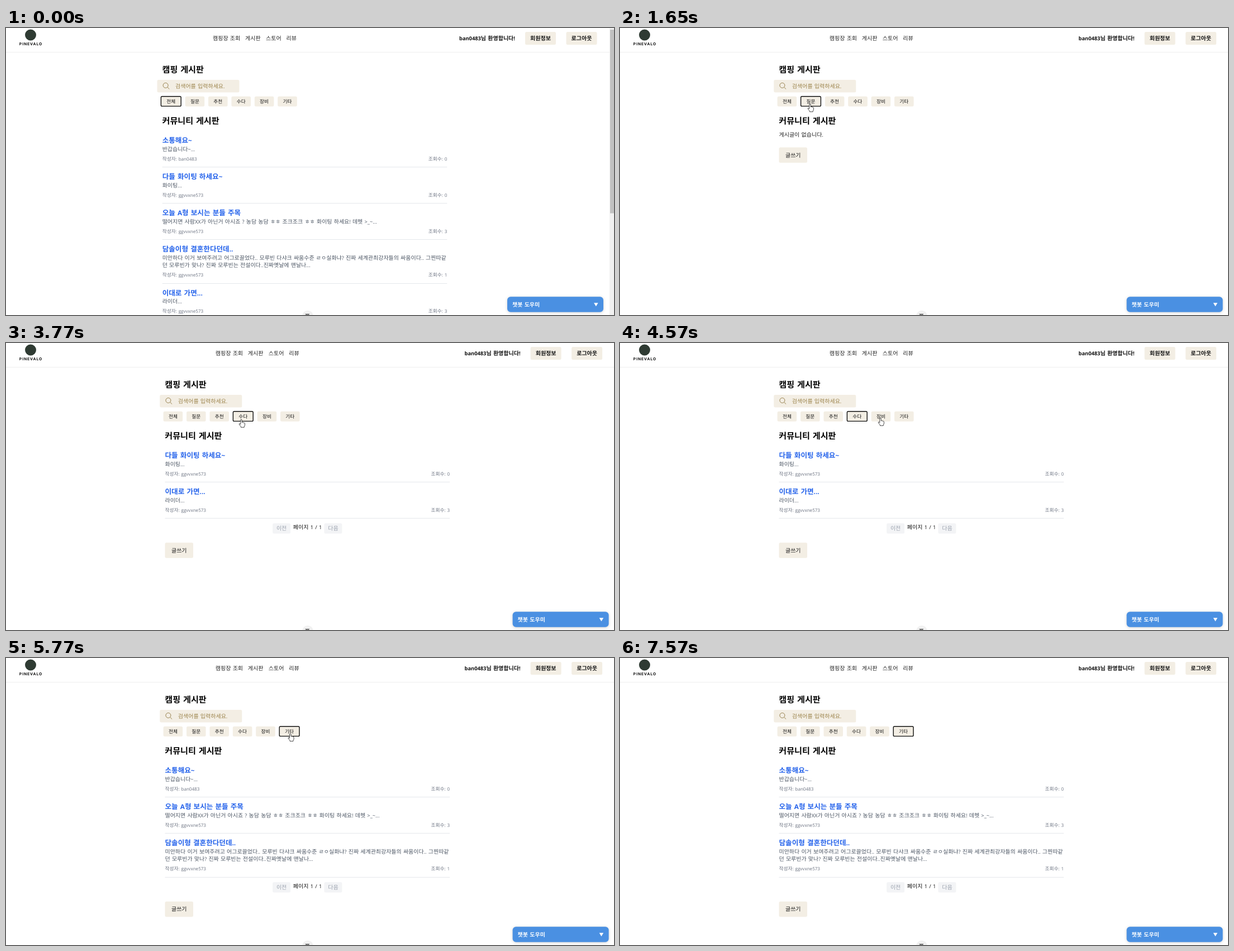
An HTML page for the animation above (8300 ms loop, 1088x515 px).

```html
<!DOCTYPE html>
<html>
<head>
<meta charset="utf-8">
<title>캠핑 게시판</title>
<style>
html, body { margin: 0; width: 100%; height: 100%; overflow: hidden; background: #fff; }
svg { display: block; width: 100%; height: 100%; }
text {
  font-family: "Noto Sans CJK KR", "Noto Sans CJK", sans-serif;
  word-spacing: .1em;
  text-rendering: geometricPrecision;
}
tspan { font-family: "Open Sans", "Noto Sans", sans-serif; font-size: .93em; }
.brand { font-family: Inter, sans-serif; letter-spacing: .9px; }
.chat { filter: drop-shadow(0 1.5px 2.5px rgba(0, 0, 0, .18)); }
#cursor path { fill: #fff; stroke: #1c1c1c; stroke-width: .8; stroke-linejoin: round; }
#cursor #beam { fill: none; stroke-width: 1; }
</style>
</head>
<body>
<svg viewBox="0 0 1088 515" preserveAspectRatio="none">
  <g id="page"></g>
  <g id="cursor">
    <path id="arrow" d="M0 0V10L2.4 8L4 11.6L5.5 11L4 7.4H7.2Z"/>
    <path id="hand" d="M-1.2 1Q0-.6 1.2 1V5.5Q2.2 4.8 3 5.8Q4 5.2 4.8 6.3Q6.2 5.8 6.4 7.5V10Q6.2 12 5.2 13V14.3H-.6V13Q-2 11.5-3.6 9Q-4.2 7.6-2.8 7.6L-1.2 9Z"/>
    <path id="beam" d="M-1.5-4H1.5M0-4V4M-1.5 4H1.5"/>
  </g>
</svg>
<script>
const LOOP = 8300, STEP = 200 / 3;
const SAND = '#f3eee4', INK = '#111', GRAY = '#4b5563', MUTED = '#6b7280';
const CATS = ['전체', '질문', '추천', '수다', '장비', '기타'];

const post = (title, lines, author, views) => ({ title, lines, author, views });
const hello = post('소통해요~', ['반갑습니다~...'], 'ban0483', 0);
const cheer = post('다들 화이팅 하세요~', ['화이팅...'], 'ggvvxne573', 0);
const exam = post('오늘 A형 보시는 분들 주목',
  ['떨어지면 사람XX가 아닌거 아시죠 ? 농담 농담 ㅎㅎ 조크조크 ㅎㅎ 화이팅 하세요! 데헷 >_~...'], 'ggvvxne573', 3);
const wedding = post('담솔이형 결혼한다던데..', [
  '미안하다 이거 보여주려고 어그로끌었다.. 모루빈 다샤크 싸움수준 ㄹㅇ실화냐? 진짜 세계관최강자들의 싸움이다.. 그찐따같',
  '던 모루빈가 맞나? 진짜 모루빈는 전설이다..진짜옛날에 맨날나...'], 'ggvvxne573', 1);
const rider = post('이대로 가면...', ['라이더...'], 'ggvvxne573', 3);
const spots = post('광주 주변에 좋은 캠핑장 없나요?', ['ㅈㄱㄴ...'], 'oddel', 4);
const japan = post('일본가보자', ['가보자...'], 'oddel', 16);

const ALL = [hello, cheer, exam, wedding, rider], NONE = [];
const TIPS = [spots, japan], TALK = [cheer, rider], MISC = [hello, exam, wedding];

// start time, focused category, posts
const VIEWS = [
  [0, 0, ALL], [1580, 1, ALL], [1650, 1, NONE], [2450, 2, NONE], [2510, 2, TIPS],
  [3710, 3, TIPS], [3770, 3, TALK], [4840, 4, NONE], [5700, 5, NONE], [5770, 5, MISC]
];

// time, x, y of the pointer
const PATH = [
  [380, 962, 483], [580, 304, 172], [715, 304, 172], [980, 326, 157], [1245, 345, 139],
  [1380, 355, 140], [1580, 340, 136], [1910, 340, 136], [2310, 375, 136], [2640, 375, 136],
  [2912, 408, 145], [3150, 416, 145], [3510, 421, 137], [3970, 421, 137], [4240, 445, 139],
  [4570, 466, 134], [4970, 466, 134], [5500, 508.7, 135], [5970, 508.7, 135], [6300, 502, 156],
  [6570, 491, 181], [6900, 491, 181], [7240, 1056, 424], [7440, 1082, 499], [7510, 1085, 508]
];

const $ = id => document.getElementById(id);

function text(x, y, str, size, fill = INK, weight = 400, anchor = 'start') {
  const rich = str.replace(/[!-~]+/g, m => `<tspan>${m}</tspan>`);
  return `<text x="${x}" y="${y}" font-size="${size}" fill="${fill}" font-weight="${weight}" text-anchor="${anchor}">${rich}</text>`;
}

function rect(x, y, w, h, fill, r = 0, extra = '') {
  return `<rect x="${x}" y="${y}" width="${w}" height="${h}" rx="${r}" fill="${fill}" ${extra}/>`;
}

function button(x, y, w, h, label, size = 10, weight = 700, fill = SAND, color = INK) {
  return rect(x, y, w, h, fill, 2.5) + text(x + w / 2, y + h / 2 + size * .37, label, size, color, weight, 'middle');
}

const writeButton = (x, y) => button(x, y, 50.5, 27.5, '글쓰기', 10, 500);
const pageButton = (x, y, label) => button(x, y, 32, 18.5, label, 10, 400, '#f3f4f6', '#9ca3af');

const shiftOf = posts => posts === ALL ? 0 : 4.8;

function chips(focus, d) {
  let x = 276.8 + d;
  return CATS.map((label, i) => {
    const on = i === focus, w = on ? 37 : 34.6, chip = { x, w, label, on };
    x += w + 6.8;
    return chip;
  });
}

function header(d) {
  const r = 2 * d;
  return rect(0, 43, 1088, 1, '#eeeeee') +
    '<circle cx="44" cy="12.5" r="10" fill="#2f3b33"/>' +
    '<text class="brand" x="44.5" y="31.4" font-size="6.8" font-weight="700" fill="#111" text-anchor="middle">PINEVALO</text>' +
    [[370, '캠핑장 조회'], [428, '게시판'], [465, '스토어'], [501.5, '리뷰']]
      .map(([x, s]) => text(x + d, 22, s, 10, '#222')).join('') +
    text(911 + r, 22, 'ban0483님 환영합니다!', 10, INK, 700, 'end') +
    button(929 + r, 7, 55, 23, '회원정보') +
    button(1002.5 + r, 7, 55, 23, '로그아웃');
}

function filters(focus, d) {
  return text(279.5 + d, 80, '캠핑 게시판', 15.1, '#000', 700) +
    rect(270.5 + d, 93, 147, 22.5, SAND, 2.5) +
    `<g transform="translate(${d} 0)" fill="none" stroke="#96804c"><circle cx="285.6" cy="103" r="4.5"/><path d="M289 106.4L292.3 109.6"/></g>` +
    text(303 + d, 107.8, '검색어를 입력하세요.', 10, '#9c844c') +
    chips(focus, d).map(c => button(c.x, 122.7, c.w, 18, c.label, 8.7, 500) +
      (c.on ? rect(c.x + .6, 122.8, c.w - 1.2, 17.6, 'none', 2, 'stroke="#111" stroke-width="1.4"') : '')).join('') +
    text(279.5 + d, 172.2, '커뮤니티 게시판', 15.1, '#000', 700);
}

function list(posts, d) {
  const x = 279.7 + d, right = 789.3 + d;
  if (!posts.length) return text(x, 195.3, '게시글이 없습니다.', 10, '#222') + writeButton(x, 214.3);
  let y = 201.5, out = '';
  for (const p of posts) {
    const extra = (p.lines.length - 1) * 13.8;
    out += text(x, y + 4.9, p.title, 12.6, '#2563eb', 700) +
      p.lines.map((s, i) => text(x, y + 19 + i * 13.8, s, 9.97, GRAY)).join('') +
      text(x, y + 36 + extra, '작성자: ' + p.author, 8.7, MUTED) +
      text(right, y + 36 + extra, '조회수: ' + p.views, 8.7, MUTED, 400, 'end') +
      rect(x, Math.round(y + 47.3 + extra), right - x, 1, '#e5e7eb');
    y += 65 + extra;
  }
  const end = y - 17.3;
  return out +
    pageButton(472.3 + d, end + 9.3, '이전') +
    text(534.7 + d, end + 20, '페이지 1 / 1', 10, INK, 400, 'middle') +
    pageButton(564.6 + d, end + 9.3, '다음') +
    writeButton(x, end + 44);
}

function overlay(d) {
  const x = 897 + 2 * d;
  return rect(x, 482.2, 172, 27.6, '#4a90e2', 6, 'class="chat"') +
    text(x + 9, 499.8, '챗봇 도우미', 10, '#fff', 700) +
    `<path d="M${x + 155} 493.2H${x + 162.6}L${x + 158.8} 499.6Z" fill="#fff"/>` +
    '<circle cx="540" cy="517" r="10" fill="#f1f1f1"/>' +
    '<path d="M535.5 513.5H543M537 515L539.2 513.5L541.5 515" fill="none" stroke="#444"/>' +
    (d ? '' : rect(1080, 0, 8, 515, '#f1f1f1') + rect(1081, 3, 7, 329.5, '#c1c1c1'));
}

function pointAt(t) {
  const next = PATH.findIndex(p => p[0] >= t);
  const i = next < 0 ? PATH.length - 1 : Math.max(1, next);
  const [t0, x0, y0] = PATH[i - 1], [t1, x1, y1] = PATH[i];
  const u = Math.min(1, Math.max(0, (t - t0) / (t1 - t0)));
  return [x0 + (x1 - x0) * u, y0 + (y1 - y0) * u];
}

function cursorKind(x, y, focus, d) {
  const onChip = y > 122 && y < 141 && chips(focus, d).some(c => x >= c.x && x <= c.x + c.w);
  const chatX = 897 + 2 * d;
  const onChat = y > 482 && y < 510 && x > chatX && x < chatX + 172;
  if (onChip || onChat) return 'hand';
  return y > 160 && y < 176 && x > 280 + d && x < 381 + d ? 'beam' : 'arrow';
}

let shown = null;

function draw(t) {
  const view = VIEWS.filter(v => v[0] <= t).pop();
  const [, focus, posts] = view, d = shiftOf(posts);
  if (view !== shown) {
    shown = view;
    $('page').innerHTML = header(d) + filters(focus, d) + list(posts, d) + overlay(d);
  }
  const visible = t >= 380 && t < 7300 || t >= 7440 && t < 7570;
  $('cursor').style.display = visible ? '' : 'none';
  if (!visible) return;
  // the pointer advances 15 times a second
  const [x, y] = pointAt(Math.floor((t + 32) / STEP) * STEP - 20);
  const kind = cursorKind(x, y, focus, d);
  for (const id of ['arrow', 'hand', 'beam']) $(id).style.display = id === kind ? '' : 'none';
  $('cursor').setAttribute('transform', `translate(${x.toFixed(1)} ${y.toFixed(1)})`);
}

const start = performance.now();
function tick() {
  draw((performance.now() - start) % LOOP);
  requestAnimationFrame(tick);
}
tick();
</script>
</body>
</html>
```
